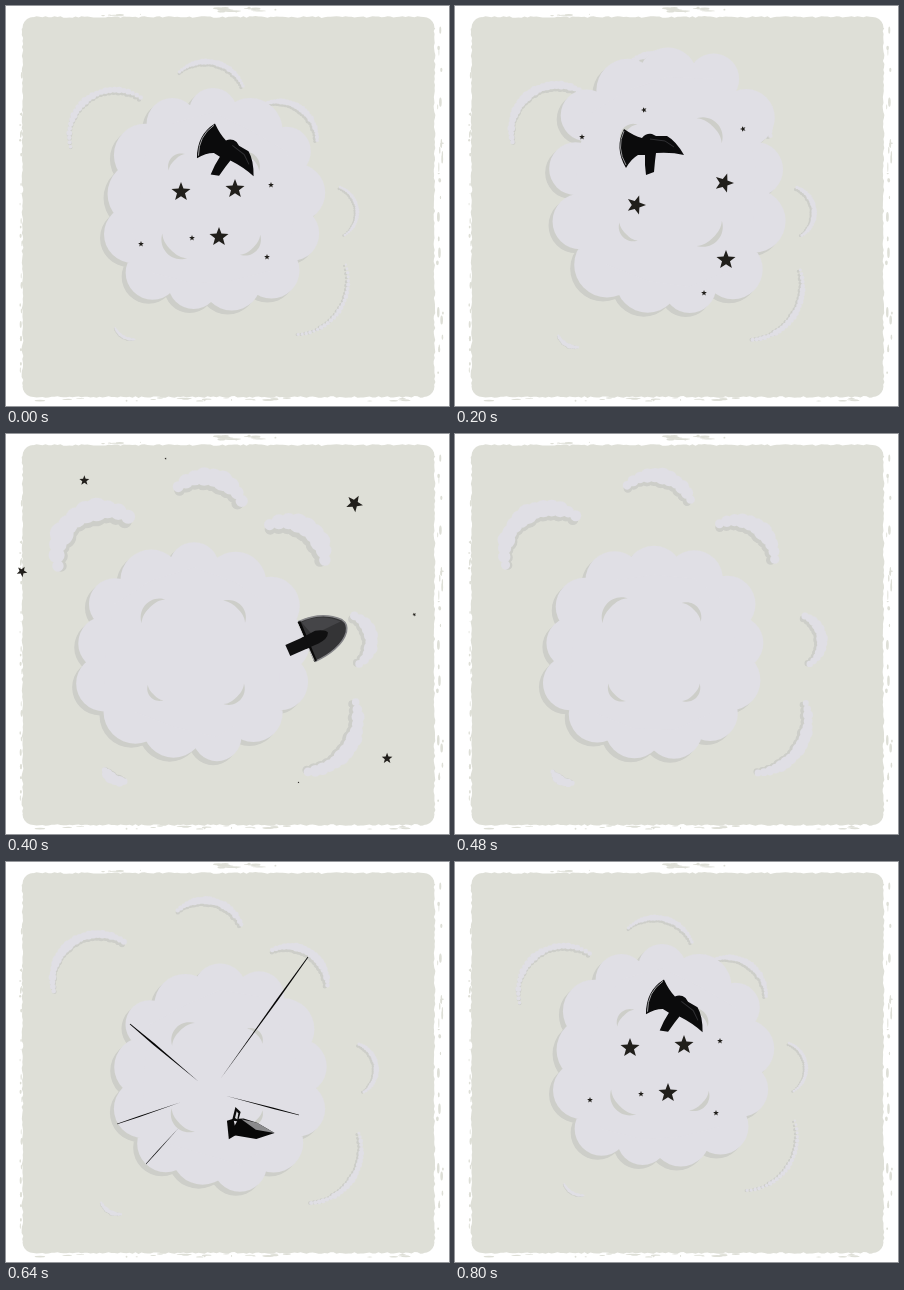
Recreate the animation shown at these times as an HTML page with a canvas. Size 443 by 400 pixels, loop 0.84 s.

```html
<!DOCTYPE html>
<html lang="en">
<head>
<meta charset="utf-8">
<title>Cloud brawl</title>
<style>
  html, body { margin: 0; width: 100%; height: 100%; overflow: hidden; background: #fff; }
  canvas { display: block; width: 443px; height: 400px; }
</style>
</head>
<body>
<canvas id="stage" width="443" height="400"></canvas>
<script>
const W = 443, H = 400, LOOP = 840, STEP = 40, TAU = Math.PI * 2;
const PAPER = '#dedfd7', PUFF = '#e0dfe5', SHADE = '#cdcec9', INK = '#211f1b';
const { sin, cos, abs, min, max, hypot, PI } = Math;
const ctx = document.getElementById('stage').getContext('2d');

// time, then centre and half size of the cloud
const cloudKeys = [
  [0, [207, 197, 113, 115]], [200, [213, 176, 123, 141]], [320, [212, 212, 112, 115]],
  [400, [188, 219, 122, 112]], [560, [210, 218, 107, 110]], [640, [214, 215, 109, 116]],
  [800, [207, 197, 113, 115]]
];

// centre, radius, start and end angle, width
const wisps = [
  [98, 122, 46, 2.9, 5.3, 12],
  [199, 84, 40, -2.3, -.4, 10],
  [279, 127, 39, -2, 0, 11],
  [337, 207, 27, -1.2, 1, 7],
  [297, 283, 54, -.3, 1.5, 8],
  [118, 326, 20, 1.5, 2.7, 6]
];
const wispWidth = [[0, [.3]], [200, [.4]], [320, [1]], [400, [1]], [560, [.6]], [640, [.4]], [720, [.15]], [800, [.3]]];
const wispSpread = [[0, [.9]], [320, [1]], [640, [1.05]], [720, [.9]], [800, [.9]]];

// start point and size, turning point, far point and size
const stars = [
  [[213, 231, 10], [271, 254], [357, 309, 14]],
  [[229, 183, 10], [269, 177], [331, 93, 22]],
  [[175, 186, 10], [181, 199], [52, 151, 14]],
  [[135, 238, 3], [127, 131], [89, 65, 13]],
  [[265, 179, 3], [288, 123], [382, 168, 5]],
  [[186, 232, 3], [189, 104], [166, 42, 3]],
  [[261, 251, 3], [249, 287], [283, 335, 2.5]]
];

const strike = { hub: [197, 226], gap: 28, width: 3, tips: [[42, 12], [352, 98], [30, 271], [377, 288], [332, 372]] };
const fade = { hub: [205, 230], gap: 16, width: 1.9, tips: [[124, 162], [302, 95], [293, 253], [111, 262], [140, 302]] };

// x, y, turn
const axeOut = [[0, [223, 149, .53]], [200, [197, 143, 0]], [320, [162, 160, -.84]]];
const axeBack = [[720, [222, 170, .85]], [800, [223, 149, .53]]];
const shovelPath = [[280, [264, 224, -.44]], [320, [283, 215, -.44]], [400, [301, 208, -.42]], [440, [296, 211, -.42]]];
const knifePath = [[520, [208, 264, 1.3]], [560, [217, 276, .96]], [640, [228, 265, .17]], [680, [231, 260, -.15]]];

const lerp = (a, b, k) => a + (b - a) * k;
const noise = n => { const v = sin(n * 12.9898) * 43758.5453; return v - Math.floor(v); };

function span(keys, t) {
  let i = 0;
  while (i < keys.length - 2 && t >= keys[i + 1][0]) i++;
  const a = keys[i], b = keys[i + 1];
  return [a, b, min(1, max(0, (t - a[0]) / (b[0] - a[0])))];
}

function at(keys, t) {
  const [a, b, k] = span(keys, t);
  return a[1].map((v, i) => lerp(v, b[1][i], k));
}

function poly(points, fill, g = ctx) {
  g.beginPath();
  points.forEach(([x, y]) => g.lineTo(x, y));
  g.closePath();
  g.fillStyle = fill;
  g.fill();
}

function discs(list, fill) {
  ctx.beginPath();
  for (const [x, y, r] of list) {
    ctx.moveTo(x + r, y);
    ctx.arc(x, y, r, 0, TAU);
  }
  ctx.fillStyle = fill;
  ctx.fill();
}

// Lobes sit inside a rounded box; each key time has its own uneven rim
function rim([time, [cx, cy, rx, ry]]) {
  const n = 13, seed = time % 800;
  return Array.from({ length: n }, (_, i) => {
    const q = i / n * TAU - PI / 2, c = cos(q), s = sin(q);
    const r = 24 + 9 * noise(seed + i), inset = 1 - .1 * noise(seed + i * 3.7);
    const k = inset / (abs(c) ** 2.5 + abs(s) ** 2.5) ** .4;
    return [cx + (rx - r) * k * c, cy + (ry - r) * k * s, r];
  });
}

function curl(x, y, r, a, b) {
  const outer = [], inner = [], thick = 2 + r * .16;
  for (let i = 0; i <= 20; i++) {
    const k = i / 20, q = lerp(a, b, k), d = r - thick * sin(PI * k);
    outer.push([x + r * cos(q), y + r * sin(q)]);
    inner.unshift([x + d * cos(q), y + d * sin(q)]);
  }
  poly(outer.concat(inner), SHADE);
}

function drawCloud(t) {
  const [a, b, k] = span(cloudKeys, t), end = rim(b);
  const lobes = rim(a).map((l, i) => l.map((v, j) => lerp(v, end[i][j], k)));
  for (const [dx, dy, fill] of [[-4, 4, SHADE], [0, 0, PUFF]]) {
    ctx.save();
    ctx.translate(dx, dy);
    discs(lobes, fill);
    poly(lobes, fill);
    ctx.restore();
  }
  const [cx, cy, rx, ry] = at(cloudKeys, t);
  for (let i = 0; i < 4; i++) {
    const q = PI / 4 + i * PI / 2, r = 16 + 4 * sin(i * 2 + t / 130);
    curl(cx + rx * .4 * cos(q), cy + ry * .45 * sin(q), r, q - 1.1, q + 1.1);
  }
}

function drawWisps(t) {
  const [thin] = at(wispWidth, t), [far] = at(wispSpread, t);
  for (const [x, y, r, a, b, width] of wisps) {
    const w = width * thin, ox = lerp(210, x, far), oy = lerp(200, y, far);
    const n = min(24, Math.ceil(r * (b - a) / (w * .95)));
    const lit = [], dark = [];
    for (let i = 0; i <= n; i++) {
      const k = i / n, q = lerp(a, b, k), size = w * (.55 + .4 * sin(PI * k)) * (.85 + .3 * noise(i + x));
      lit.push([ox + r * cos(q), oy + r * sin(q), size]);
      dark.push([ox + (r - w * .35) * cos(q) - 1, oy + (r - w * .35) * sin(q) + 1, size]);
    }
    discs(dark, SHADE);
    discs(lit, PUFF);
  }
}

function star(x, y, r, turn) {
  const pts = [];
  for (let i = 0; i < 10; i++) {
    const q = turn - PI / 2 + i * PI / 5, d = i % 2 ? r * .42 : r;
    pts.push([x + d * cos(q), y + d * sin(q)]);
  }
  poly(pts, INK);
}

function drawStars(t) {
  stars.forEach(([from, via, far], i) => {
    const past = k => [0, 1].map(j => far[j] + (far[j] - via[j]) * k);
    const keys = [
      [0, from], [200, [...via, from[2]]], [320, far], [400, [...past(.28), far[2] * .4]],
      [460, [...past(.5), 0]], [700, [205, 215, 0]], [800, from]
    ];
    const [x, y, r] = at(keys, t);
    if (r > 0) star(x, y, r, .6 * sin(i * 1.05) * min(1, t % 800 / 320));
  });
}

// Rays run from near the hub to their tips; later ones start farther out
function drawRays({ hub: [hx, hy], gap, width, tips }, reach) {
  tips.forEach(([tx, ty], i) => {
    const len = hypot(tx - hx, ty - hy), ux = (tx - hx) / len, uy = (ty - hy) / len;
    const near = gap * max(1, i - 1), far = lerp(near, len, reach), w = width * (1 - i * .15) / 2;
    const point = (d, side) => [hx + ux * d - uy * side, hy + uy * d + ux * side];
    const mid = lerp(near, far, .65);
    poly([point(near, 0), point(mid, w), point(far, w / 2), point(far, -w / 2), point(mid, -w)], '#050505');
  });
}

function fillPath(d, color) {
  ctx.fillStyle = color;
  ctx.fill(new Path2D(d));
}

function line(d, color, width) {
  ctx.strokeStyle = color;
  ctx.lineWidth = width;
  ctx.stroke(new Path2D(d));
}

function axe() {
  fillPath('M-28-20Q-18-13-10-11Q-6-16 0-15L4-13 15-13Q24-8 32 6Q20 3 4 4L3 12 2 23-6 26-7 16-7 6-14 6Q-21 10-26 19Q-38-1-28-20Z', '#0b0b0c');
  line('M-28-18Q-36-1-26 16', '#b5b5b8', .8);
  line('M-2-10L13-8 22-2', '#303033', 1);
}

function shovel() {
  const blade = 'M1-22C18-22 32-16 41-6Q45 0 40 7C32 17 15 21 0 21Z';
  fillPath(blade, '#343436');
  fillPath('M3-20C17-21 30-15 39-5L8-4Z', '#454548');
  line(blade, '#858588', 1.6);
  line('M1-22L0 21', '#0a0a0a', 3);
  line('M-1-20V20', '#d4d4d6', .8);
  fillPath('M-4-6L12-7Q22-4 23 0 20 6 10 6L-4 6Z', '#101011');
}

function knife() {
  fillPath('M-3 8L3-9 8-10 22-8 41-1 24 8Z', '#080808');
  fillPath('M6-9L22-8 41-1 22-1Z', '#8b8b8d');
  fillPath('M-3-6L-2-20 4-16 3-6Z', '#0a0a0a');
  fillPath('M-.5-9L0-16 2-14V-8Z', '#d8d8da');
  fillPath('M-3 13L-8-5-2-8 4 7Z', '#080808');
}

function place([x, y, turn], shape) {
  ctx.save();
  ctx.translate(x, y);
  ctx.rotate(turn);
  shape();
  ctx.restore();
}

function drawTools(t) {
  if (t <= 320) place(at(axeOut, t), axe);
  if (t >= 720) place(at(axeBack, t), axe);
  if (t >= 280 && t <= 440) {
    const pose = at(shovelPath, t);
    place(pose, shovel);
    // The handle slides out of the cloud
    if (t > 320) place(pose, () => fillPath('M-21-6H0V6H-21Z', '#101011'));
  }
  if (t >= 520 && t <= 680) place(at(knifePath, t), knife);
}

// Rough-edged paper, drawn once
const paper = document.createElement('canvas');
paper.width = W;
paper.height = H;
(function drawPaper(g) {
  let count = 0;
  const rnd = () => noise(++count);
  g.fillStyle = '#fff';
  g.fillRect(0, 0, W, H);
  const pts = [], cx = 222.5, cy = 201, rx = 206, ry = 190, rad = 11;
  for (let side = 0; side < 4; side++) {
    const a = side * PI / 2, flip = side % 2;
    const c = Math.round(cos(a)), s = Math.round(sin(a));
    const out = flip ? ry : rx, along = (flip ? rx : ry) - rad;
    for (let d = -along; d < along; d += 3) {
      const o = out + (rnd() - .5) * 1.8;
      pts.push([cx + c * o - s * d, cy + s * o + c * d]);
    }
    for (let i = 0; i <= 5; i++) {
      const q = a + i * PI / 10;
      pts.push([cx + (c - s) * (rx - rad) + rad * cos(q), cy + (s + c) * (ry - rad) + rad * sin(q)]);
    }
  }
  poly(pts, PAPER, g);
  const flecks = (n, x, y, w, h, rw, rh) => {
    g.fillStyle = PAPER;
    for (let i = 0; i < n; i++) {
      g.beginPath();
      g.ellipse(x + rnd() * w, y + rnd() * h, .4 + rnd() * rw, .4 + rnd() * rh, 0, 0, TAU);
      g.fill();
    }
  };
  flecks(28, 431, 20, 6, 350, 1, 5);
  flecks(24, 14, 30, 2, 350, .8, 3);
  flecks(28, 25, 392, 390, 3, 6, .6);
  flecks(16, 212, 2, 58, 4, 9, 1);
  flecks(6, 80, 8, 80, 2, 8, .5);
})(paper.getContext('2d'));

function draw(t) {
  ctx.drawImage(paper, 0, 0);
  drawWisps(t);
  drawCloud(t);
  drawTools(t);
  if (t >= 520 && t < 600) drawRays(strike, t < 560 ? .6 : 1);
  if (t >= 600 && t <= 680) drawRays(fade, t > 640 ? .6 : 1);
  drawStars(t);
}

let last = -1;
function tick() {
  const t = Math.floor(performance.now() % LOOP / STEP) * STEP;
  if (t !== last) draw(last = t);
  requestAnimationFrame(tick);
}
tick();
</script>
</body>
</html>
```
